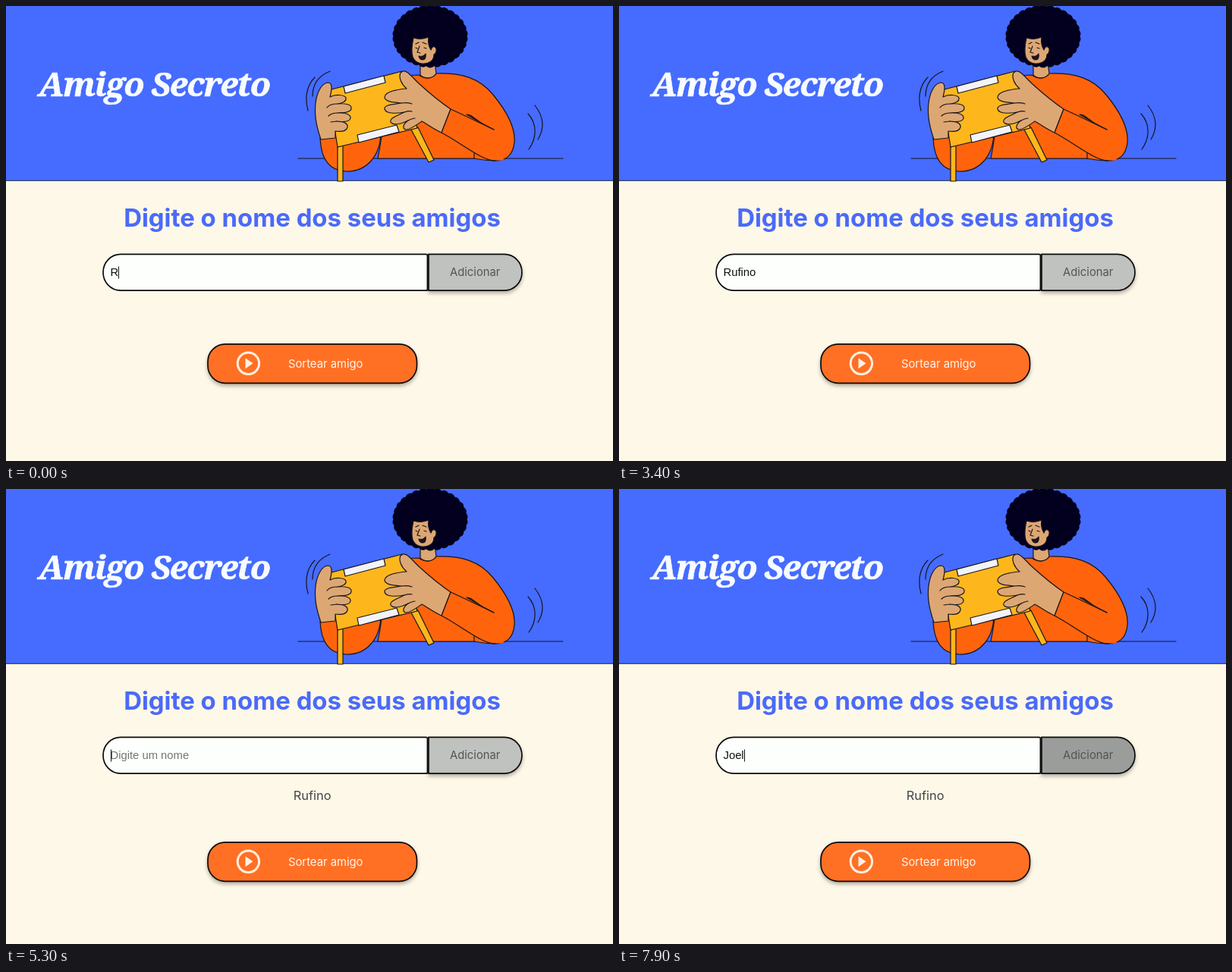
Animation, 800 px wide and 600 px high, one loop 8 s. Source, as an HTML page:

```html
<!DOCTYPE html>
<html lang="pt-BR">
<head>
<meta charset="utf-8">
<title>Amigo Secreto</title>
<style>
html, body { margin: 0; width: 100%; height: 100%; overflow: hidden; background: #fef8e8; }
svg { display: block; width: 800px; height: 600px; }
text { font: 14.8px Inter, sans-serif; }
.logo { font: italic 900 44.5px "Noto Serif", serif; fill: #f8fbff; stroke: #f8fbff; stroke-width: .7; letter-spacing: -1.5px; }
.title { font-weight: 700; font-size: 32.9px; fill: #4a6af9; text-anchor: middle; }
.field { font: 14.8px "Liberation Sans", Arial, sans-serif; }
.name { font-size: 16.4px; fill: #444; text-anchor: middle; }
.box { stroke: #0b0b0b; stroke-width: 1.7; }
.shadow { filter: drop-shadow(.5px 3px 2.5px rgba(0, 0, 0, .3)); }
.art { stroke: #18151c; stroke-width: 1.2; stroke-linejoin: round; stroke-linecap: round; }
.skin { fill: #dda774; }
.cloth { fill: #ff640c; }
.wood { fill: #fdb71c; }
.tape { fill: #f3f4fa; }
.line { fill: none; }
</style>
</head>
<body>
<svg viewBox="0 0 800 600">
  <rect width="800" height="600" fill="#fef8e8"/>
  <rect width="800" height="230" fill="#456cff"/>
  <path d="M0 230.3H800" stroke="#1c2440"/>
  <text class="logo" x="43" y="119">Amigo Secreto</text>

  <g class="art">
    <path class="line" d="M385 201H734"/>
    <path class="cloth" d="M414 174C415 200 424 217 448 218C474 219 493 199 494 168L440 160Z"/>
    <path class="cloth" d="M544 91C553 97 562 96 567 89C601 88 624 95 642 117C660 139 672 160 670 180C668 198 658 204 645 204C634 204 627 203 617 201H490C493 186 496 170 497 150L520 92Z"/>
    <path class="skin" d="M546 66V91C552 97 562 96 567 89L564 66Z"/>
    <path id="hair" fill="#03001f" stroke="none"/>
    <path class="skin" d="M537 42C535 51 534 60 536 67C539 75 548 78 556 75C562 73 564 69 564 64C568 62 568 55 565 54C562 53 561 55 560 58C557 53 556 47 557 41C550 44 543 44 537 42Z"/>
    <path class="line" d="M540 50l4 -2M549 48l5 2M545 53l-3 8 4 1M540 55l2 1M551 55l3 1"/>
    <path fill="#22131a" d="M544 66C548 67 551 66 553 63C554 68 552 71 549 71C546 71 545 69 544 66Z"/>
    <path class="wood" d="M437 186L444 184L444 231H437ZM534 163L543 160L564 203L557 206Z"/>
    <path class="wood" d="M425 111L522 86L542 161L437 186Z"/>
    <path class="tape" d="M445 106L498 92L500 101L447 115ZM463 170L515 157L518 166L465 180Z"/>
    <path class="skin" d="M415 176C410 161 406 146 408 128C410 112 417 101 425 101C430 102 430 109 427 120C434 116 446 117 448 121C449 126 443 128 437 129C447 128 456 130 455 135C455 140 446 141 437 141C446 140 455 143 454 148C453 153 444 153 436 152C445 152 451 155 450 160C448 166 441 166 434 165L434 174Z"/>
    <path class="line" d="M437 129C430 129 425 131 423 134M437 141C431 141 427 143 425 145M436 152L428 153"/>
    <path class="skin" d="M523 86C530 85 534 93 545 103C556 113 570 125 586 136L574 167C563 162 554 155 548 152C541 157 533 163 527 163C522 162 523 156 530 151C520 156 510 158 507 153C505 148 515 145 525 140C513 142 501 142 499 136C498 130 510 130 521 128C509 127 499 126 499 120C500 113 516 110 528 109C521 103 517 94 520 88Z"/>
    <path class="line" d="M521 128Q530 127 535 129M525 140Q531 138 535 139M530 151Q536 148 539 148"/>
    <path class="cloth" d="M586 136C606 145 624 154 643 163L656 203C639 208 602 182 574 167Z" stroke="none"/>
    <path class="line" d="M643 163C624 154 606 145 586 136L574 167C602 182 629 205 645 204"/>
    <path fill="#3a56c5" d="M607 143L612 144L626 154Z"/>
    <path class="line" d="M626 154L643 163M617 194V201"/>
    <path class="line" d="M407 94C395 106 394 123 398 138M427 86C412 92 404 102 404 119M688 142C700 155 700 174 689 189M697 131C709 146 710 161 701 176"/>
  </g>

  <text class="title" x="403.5" y="291">Digite o nome dos seus amigos</text>

  <path class="box" fill="#fcfffc" d="M151 327.4H553.5Q555.5 327.4 555.5 329.4V373.2Q555.5 375.2 553.5 375.2H151A23 23.9 0 0 1 151 327.4Z"/>
  <text class="field" id="typed" x="137.5" y="356.3"></text>
  <path id="caret" d="M0 343.5V359.5" stroke="#111"/>
  <g class="shadow">
    <path class="box" id="add" d="M557 327.4H657A23 23.9 0 0 1 657 375.2H557Z"/>
  </g>
  <text x="585" y="356.3" fill="#535353">Adicionar</text>

  <text class="name" id="friend" x="403.7" y="410">Rufino</text>

  <g id="draw">
    <rect class="box shadow" x="266" y="445.8" width="275.5" height="51.5" rx="23" fill="#ff7024"/>
    <circle cx="319.4" cy="471.3" r="14.2" fill="none" stroke="#fff0e2" stroke-width="3"/>
    <path d="M315.5 464.3L325.5 471.3L315.5 478.3Z" fill="#fff0e2"/>
    <text x="372" y="476.5" fill="#fff6ee">Sortear amigo</text>
  </g>
</svg>
<script>
const LOOP = 8000, ADDED = 4300;
const $ = id => document.getElementById(id);

// time, typed text, caret visible
const typing = [
  [0, 'R', 1], [1900, 'Ru', 1], [2100, 'Ruf', 1], [2300, 'Rufi', 1],
  [2600, 'Rufin', 1], [2900, 'Rufino', 1], [3400, 'Rufino', 0],
  [3900, 'Rufino', 1], [4200, 'Rufino', 0], [ADDED, '', 0],
  [5200, '', 1], [5700, '', 0], [6100, 'J', 1], [6300, 'Jo', 1],
  [6500, 'Joe', 1], [6700, 'Joel', 1], [7200, 'Joel', 0], [7800, 'Joel', 1]
];
// time, hover amount
const hover = [[0, 0], [4000, 0], [4200, 1], [4450, 1], [4700, 0], [7250, 0], [7550, 1], [LOOP, 1]];

function curlyHair() {
  const n = 30;
  let d = '';
  for (let i = 0; i <= n; i++) {
    const a = i / n * 2 * Math.PI;
    const x = (559 + 48.5 * Math.cos(a)).toFixed(1), y = (40 + 39.5 * Math.sin(a)).toFixed(1);
    d += i ? `A7 7 0 0 1 ${x} ${y}` : `M${x} ${y}`;
  }
  return d + 'Z';
}

function between(keys, t) {
  const i = keys.findIndex(k => k[0] > t);
  const [t0, v0] = keys[i - 1], [t1, v1] = keys[i];
  return v0 + (v1 - v0) * (t - t0) / (t1 - t0);
}

function render(t) {
  const [, text, caret] = typing.filter(s => s[0] <= t).pop();
  const field = $('typed');
  field.textContent = text || 'Digite um nome';
  field.setAttribute('fill', text ? '#111' : '#757575');
  const width = text ? field.getComputedTextLength() : 0;
  $('caret').setAttribute('transform', `translate(${Math.round(137.5 + width) + .5} 0)`);
  $('caret').style.visibility = caret ? 'visible' : 'hidden';

  const h = between(hover, t), grey = 192 - 37 * h;
  $('add').setAttribute('fill', `rgb(${grey},${grey + 2},${grey})`);

  const added = t >= ADDED;
  $('friend').style.visibility = added ? 'visible' : 'hidden';
  $('draw').setAttribute('transform', `translate(0 ${added ? 20 : 0})`);
}

$('hair').setAttribute('d', curlyHair());
const start = performance.now();
function tick(now) {
  render(Math.max(0, now - start) % LOOP);
  requestAnimationFrame(tick);
}
render(0);
requestAnimationFrame(tick);
</script>
</body>
</html>
```
